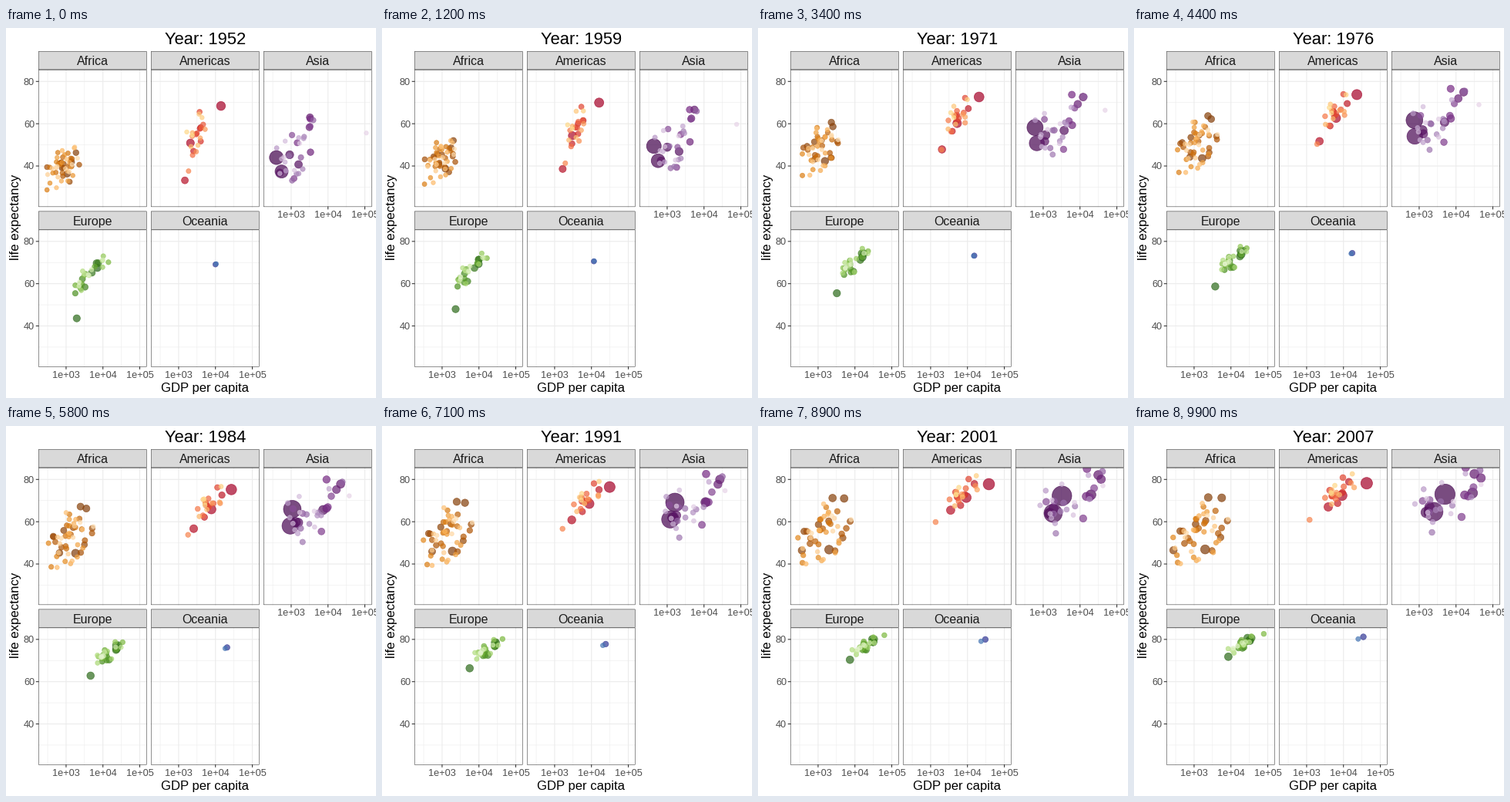
These frames come from a looping animation (480x480 px, 10 s). A matplotlib script:

```python
import numpy as np
import matplotlib.pyplot as plt
from matplotlib.animation import FuncAnimation
from matplotlib.colors import to_rgb
from matplotlib.patches import Rectangle

SIZE, FRAMES, INTERVAL = 480, 100, 100
FIRST, LAST = 1952, 2007

# layout in pixels
LEFT, TOP, WIDTH, HEIGHT = 42.05, 54.1, 140.5, 178
STRIP, GAP = 24, 5.5
X_MIN, X_SPAN = 2.249, 2.940       # log10(income)
Y_MIN, Y_SPAN = 20.65, 64.9        # life expectancy
BORDER, TICK = 1.07, 2.75
INK, GRID, LABEL = "#333333", "#EBEBEB", "#4D4D4D"

plt.rcParams["font.family"] = "Liberation Sans"
plt.rcParams["path.snap"] = False
rng = np.random.default_rng(11)


def normal(n):
    return rng.normal(size=n).clip(-1.8, 1.8)


def mix(a, b, weight):
    return weight * a + np.sqrt(1 - weight ** 2) * b


def cloud(n, start, end, link, bend):
    """Paths x0, y0, x1, y1, bend; start and end hold mean x, sd x, mean y, sd y."""
    wealth, care = normal(n), normal(n)
    cols = []
    for mx, sx, my, sy in (start, end):
        cols += [mx + sx * wealth, my + sy * mix(wealth, care, link)]
        wealth, care = mix(wealth, normal(n), 0.7), mix(care, normal(n), 0.7)
    return np.column_stack(cols + [bend + 0.1 * normal(n)])


def ramp(colors, n):
    """n colours along the ramp, all 70 % opaque."""
    rgb = np.array([to_rgb(c) for c in colors])
    t = np.linspace(0, len(rgb) - 1, n)
    return np.column_stack([np.interp(t, np.arange(len(rgb)), ch) for ch in rgb.T] + [np.full(n, 0.7)])


def point_size(pop):
    return 2 + 10 * np.sqrt(pop / 1318)


def box(ax, x, y, w, h, fill, z):
    # only the inner half of the border shows
    b = BORDER / 2
    ax.add_patch(Rectangle((x + b / 2, y + b / 2), w - b, h - b, fc=fill, ec=INK, lw=b, zorder=z))


class Panel:
    def __init__(self, name, col, row, colors, paths, leaders, giants, base, decay, growth, ease):
        self.name, self.col, self.row, self.ease = name, col, row, ease
        self.left = LEFT + col * (WIDTH + GAP)
        self.top = TOP + row * (HEIGHT + GAP + STRIP)
        # dots are ordered by population, largest first
        for rank, path in leaders.items():
            paths[rank] = path
        self.paths = paths
        n = len(paths)
        self.colors = ramp(colors, n)
        pop = np.concatenate([giants, base * np.exp(-decay * np.arange(n - len(giants)))])
        self.size0, self.size1 = point_size(pop * growth), point_size(pop)

    def px(self, x):
        return self.left + (x - X_MIN) / X_SPAN * WIDTH

    def py(self, y):
        return self.top + HEIGHT - (y - Y_MIN) / Y_SPAN * HEIGHT

    def draw(self, ax):
        left, top, right, bottom = self.left, self.top, self.left + WIDTH, self.top + HEIGHT
        for x in np.arange(2.5, 5.1, 0.5):
            ax.plot([self.px(x)] * 2, [top, bottom], color=GRID, lw=0.53 if x % 1 else BORDER, zorder=1)
        for y in range(30, 81, 10):
            ax.plot([left, right], [self.py(y)] * 2, color=GRID, lw=0.53 if y % 20 else BORDER, zorder=1)
        box(ax, left, top, WIDTH, HEIGHT, "none", 4)
        box(ax, left, top - STRIP, WIDTH, STRIP, "#D9D9D9", 5)
        ax.text((left + right) / 2, top - 6, self.name, size=16, color="#1A1A1A", ha="center", zorder=6)
        if self.row == 1 or self.col == 2:
            for k in (3, 4, 5):
                x = self.px(k)
                ax.plot([x, x], [bottom, bottom + TICK], color=INK, lw=BORDER)
                ax.text(x, bottom + 14.4, f"1e+0{k}", size=12.8, color=LABEL, ha="center")
        if self.col == 0:
            for y in (40, 60, 80):
                ax.plot([left - TICK, left], [self.py(y)] * 2, color=INK, lw=BORDER)
                ax.text(left - 5, self.py(y) + 4.4, str(y), size=12.8, color=LABEL, ha="right")
        self.dots = ax.scatter(*self.paths.T[:2], c=self.colors, edgecolors=self.colors,
                               linewidths=0.71, zorder=3)

    def update(self, t):
        x0, y0, x1, y1, bend = self.paths.T
        x = x0 + (x1 - x0) * t + 4 * t * (1 - t) * bend
        y = y0 + (y1 - y0) * (1 - (1 - t) ** self.ease)
        size = self.size0 + (self.size1 - self.size0) * t
        self.dots.set_offsets(np.column_stack([self.px(x), self.py(y)]))
        self.dots.set_sizes((0.75 * (2.845 * size + 0.945)) ** 2)


panels = [
    Panel("Africa", 0, 0, ("#7F3B08", "#B35806", "#E08214", "#FDB863", "#FEE0B6"),
          cloud(52, (2.95, 0.26, 39.5, 5), (3.18, 0.4, 54.5, 8.5), 0.4, 0.04),
          {0: (3.03, 36.3, 3.30, 46.9, 0.07), 1: (3.15, 41.9, 3.75, 71.3, 0.05),
           3: (2.89, 39.1, 2.44, 46.5, 0.2)},
          [135, 80, 76, 65], 44, 0.08, 0.27, 2),
    Panel("Americas", 1, 0, ("#A50026", "#D73027", "#F46D43", "#FDAE61", "#FEE090"),
          cloud(25, (3.5, 0.22, 53, 8.5), (3.9, 0.25, 74, 3.6), 0.55, 0.12),
          {0: (4.15, 68.4, 4.63, 78.2, 0), 1: (3.32, 50.9, 3.96, 72.4, 0.2),
           14: (3.27, 37.6, 3.08, 60.9, 0.1)},
          [301, 190, 109], 46, 0.14, 0.42, 1.35),
    Panel("Asia", 2, 0, ("#40004B", "#762A83", "#9970AB", "#C2A5CF", "#E7D4E8"),
          cloud(33, (3.15, 0.34, 47, 9), (3.75, 0.52, 71, 7), 0.7, 0.08),
          {0: (2.60, 44.0, 3.70, 73.0, -0.22), 1: (2.74, 37.4, 3.39, 64.7, -0.15),
           5: (3.51, 63.0, 4.50, 82.6, 0.26), 32: (5.04, 55.6, 4.68, 77.6, -0.26)},
          [1318, 1110], 223, 0.16, 0.38, 1.6),
    Panel("Europe", 0, 1, ("#276419", "#4D9221", "#7FBC41", "#B8E186", "#E6F5D0"),
          cloud(30, (3.7, 0.25, 65.5, 4.5), (4.35, 0.22, 78, 2.5), 0.85, 0.1),
          {0: (3.85, 67.5, 4.51, 79.4, 0.14), 1: (3.29, 43.6, 3.93, 71.8, 0)},
          [82, 71, 61, 61, 58, 40, 38], 20, 0.13, 0.75, 1.3),
    Panel("Oceania", 1, 1, ("#313695", "#4575B4"), np.zeros((2, 5)),
          {0: (4.00, 69.1, 4.54, 81.2, 0), 1: (4.02, 69.4, 4.40, 80.2, 0.02)},
          [20.4, 4.1], 0, 0, 0.44, 1),
]

fig = plt.figure(figsize=(SIZE / 72, SIZE / 72), dpi=72, facecolor="white")
ax = fig.add_axes([0, 0, 1, 1])
ax.axis("off")
for panel in panels:
    panel.draw(ax)
ax.set(xlim=(0, SIZE), ylim=(SIZE, 0))
ax.text(258.3, 472, "GDP per capita", size=16.6, ha="center")
ax.text(17.3, 245.6, "life expectancy", size=16.8, rotation=90, rotation_mode="anchor", ha="center")
title = ax.text(258.3, 21.3, "", size=22, ha="center")


def update(i):
    t = i / (FRAMES - 1)
    title.set_text(f"Year: {round(FIRST + (LAST - FIRST) * t)}")
    for panel in panels:
        panel.update(t)
    return [title] + [p.dots for p in panels]


anim = FuncAnimation(fig, update, frames=FRAMES, interval=INTERVAL, repeat=True, repeat_delay=0)
plt.show()
```
